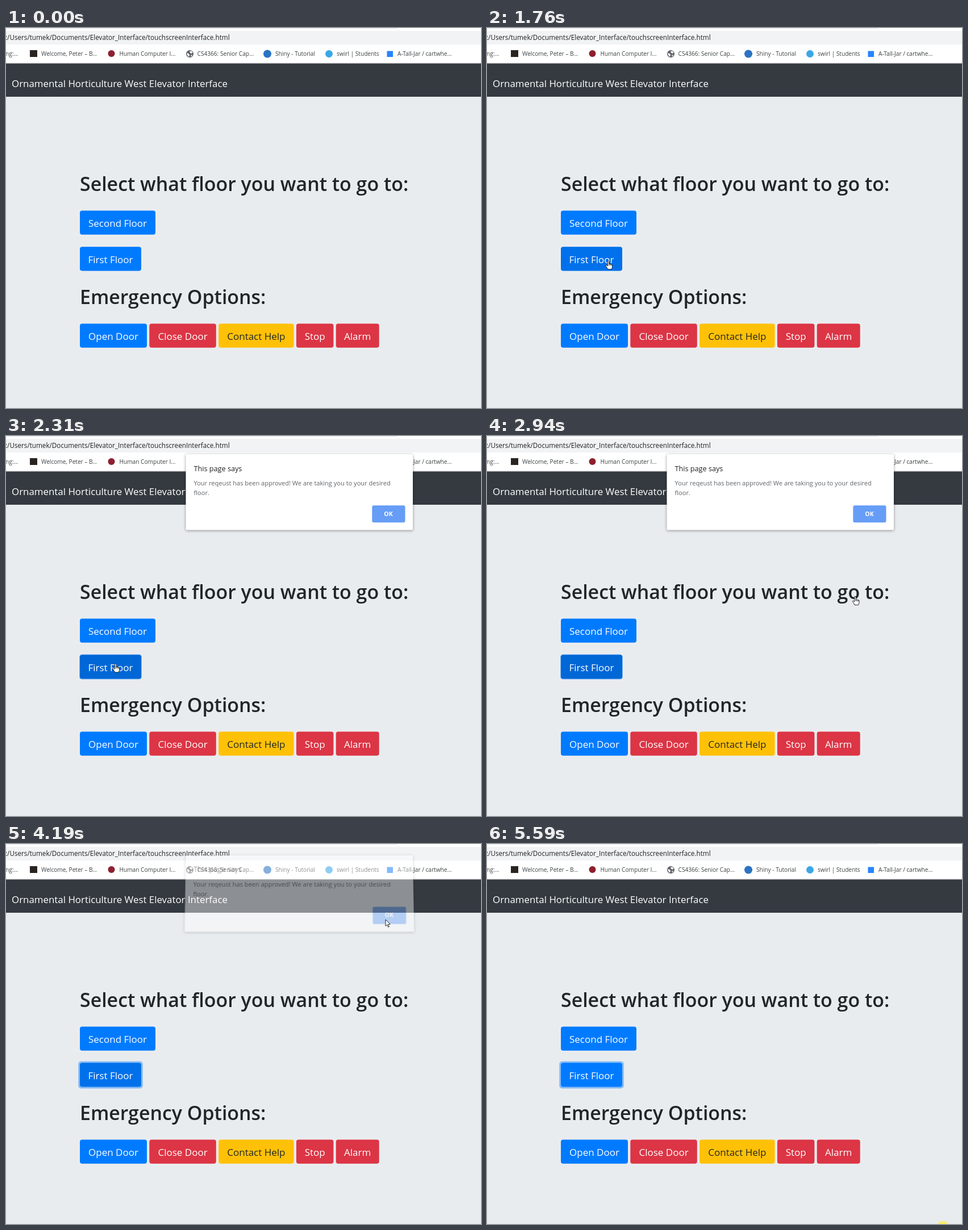
An HTML page for the animation above (5.67 s loop, 836 px wide and 669 px high).

```html
<!DOCTYPE html>
<html lang="en">
<head>
<meta charset="utf-8">
<title>Elevator Interface</title>
<style>
html, body { margin: 0; width: 100%; height: 100%; overflow: hidden; background: #e9ecef; }
svg { position: absolute; left: 0; top: 0; display: block; }
text { font-family: "Open Sans", "Noto Sans", sans-serif; white-space: pre; }
.url { font-size: 11.7px; fill: #202124; }
.marks text { font-size: 10.15px; fill: #3c4043; }
.brand { font-size: 16.9px; fill: #fff; }
.head { font-size: 33.9px; font-weight: 600; fill: #212529; }
.btn { font-size: 17px; text-anchor: middle; }
#dialog { left: 316px; top: 32px; overflow: visible; transform-origin: 50% 0;
  filter: drop-shadow(0 1.5px 2.5px rgba(0,0,0,.4)); opacity: 0; }
#dialog .title { font-size: 12.67px; fill: #222; }
#dialog .body { font-size: 11.05px; fill: #606368; }
#dialog .ok { font-size: 10.5px; font-weight: 700; fill: #fff; text-anchor: middle; }
#pointer path { fill: #fff; stroke: #111; stroke-width: .9; stroke-linejoin: round; }
</style>
</head>
<body>
<svg id="page" width="836" height="669">
  <rect width="836" height="63" fill="#fff"/>
  <rect width="688" height="1" fill="#e3e5e8"/>
  <rect y="5" width="836" height="24" fill="#f1f3f4"/>
  <text class="url" x="-1" y="21">:/Users/tumek/Documents/Elevator_Interface/touchscreenInterface.html</text>
  <g class="marks">
    <rect x="42" y="39" width="13" height="12" fill="#2a2420"/>
    <circle cx="185.5" cy="45" r="6" fill="#8e1f2d"/>
    <circle cx="323.5" cy="45.5" r="6.5" fill="#5f6368"/>
    <path d="M318.5 44l3 1 1.5 2.5-1 3q-3.5-2-3.5-6.5zM323 41l3.5-.5 2 3-2.500 1.500-2-1.500zM325 47.500h3l-2 3z" fill="#fff"/>
    <circle cx="460" cy="45.5" r="7" fill="#2a74c4"/>
    <circle cx="568.5" cy="45.5" r="6.5" fill="#3aa6e8"/>
    <rect x="670.5" y="40.5" width="10.5" height="10.5" fill="#2684ff"/>
    <text x="-1" y="49">ng:...</text>
    <text x="62" y="49">Welcome, Peter – B...</text>
    <text x="199.5" y="49">Human Computer I...</text>
    <text x="336.5" y="49">CS4366: Senior Cap...</text>
    <text x="474" y="49">Shiny - Tutorial</text>
    <text x="582" y="49">swirl | Students</text>
    <text x="689" y="49">A-Tall-Jar / cartwhe...</text>
  </g>
  <rect y="61" width="836" height="2" fill="#dadce0"/>
  <rect y="62.5" width="836" height="58.5" fill="#343a40"/>
  <text class="brand" x="10" y="104">Ornamental Horticulture West Elevator Interface</text>
  <text class="head" x="130" y="287">Select what floor you want to go to:</text>
  <text class="head" x="130" y="486">Emergency Options:</text>
  <rect id="ring" rx="5" fill="#007bff" fill-opacity=".42"/>
</svg>

<svg id="dialog" width="400" height="134">
  <rect x=".5" width="399.5" height="133.5" rx="2" fill="#fff"/>
  <text class="title" x="14.5" y="29.5">This page says</text>
  <text class="body" x="14.5" y="55">Your reqeust has been approved! We are taking you to your desired</text>
  <text class="body" x="14.5" y="72">floor.</text>
  <rect id="ok" x="328.3" y="90.2" width="58.2" height="30" rx="3"/>
  <text class="ok" x="357" y="108.5">OK</text>
</svg>

<svg id="top" width="836" height="669">
  <g id="pointer">
    <circle id="click" cx="-.5" cy="2" r="10.5" fill="#fff03c" fill-opacity=".7"/>
    <path id="arrow" d="M0 0V11.5L2.700 9 4.600 13.300 6.400 12.500 4.500 8.400 8.200 8.200Z"/>
    <path id="hand" d="M-1.200 1Q0-.6 1.200 1V6Q2.500 5.200 3.500 6.400 4.800 5.800 5.600 7 7 6.600 7 8.200V11Q7 13 5.600 15.500H-1Q-1.600 13-4.600 9.600-4.800 8-3 8.200L-1.200 9.800ZM1.200 6V9M3.500 6.400V9M5.600 7V9"/>
  </g>
</svg>

<script>
// All times below are in ticks: the loop is cut into equal steps
const LOOP = 5670, TICKS = 73, PHASE = 32;
const BLUE = '#007bff', RED = '#dc3545', AMBER = '#ffc107';
const LEFT = 130, FIRST_Y = 385.3, HEIGHT = 42.3, GAP = 4.3;

const $ = id => document.getElementById(id);
const set = (el, attrs) => { for (const k in attrs) el.setAttribute(k, attrs[k]); return el; };
const make = (tag, attrs) => $('page').appendChild(
  set(document.createElementNS('http://www.w3.org/2000/svg', tag), attrs));
const show = (el, on) => { el.style.display = on ? '' : 'none'; };
const ramp = (n, a, b) => Math.min(1, Math.max(0, (n - a) / (b - a)));
const ease = k => k * k * (3 - 2 * k);
const mix = (a, b, k) => `color-mix(in srgb, ${a}, ${b} ${k * 100}%)`;

function button(label, x, y, width, fill) {
  const box = make('rect', { x, y, width, height: HEIGHT, rx: 4, fill });
  const color = fill === AMBER ? '#212529' : '#fff';
  make('text', { class: 'btn', x: x + width / 2, y: y + 28.5, fill: color }).textContent = label;
  return box;
}

button('Second Floor', LEFT, 321.5, 133, BLUE);
const first = button('First Floor', LEFT, FIRST_Y, 108, BLUE);
let right = LEFT;
const [, , help] = [
  ['Open Door', 118, BLUE], ['Close Door', 117.5, RED], ['Contact Help', 132.5, AMBER],
  ['Stop', 65.5, RED], ['Alarm', 76, RED],
].map(([label, width, fill]) => {
  const box = button(label, right, 520.5, width, fill);
  right += width + GAP;
  return box;
});

// Pointer glides: start, end, x, y, height of the arc
const glides = [
  [3, 12, 414, 532, 185],
  [12, 15, 397, 512, 0],
  [15, 17, 327, 457, 0],
  [20, 24, 192.5, 400.5, 0],
  [34, 38, 648, 282, 0],
  [40, 48, 668, 133, 0],
  [56, 60, 731, 428, 0],
  [62, 68, 803, 672, 0],
];

function pointerAt(n) {
  let x = 690, y = 595;
  for (const [start, end, toX, toY, arc] of glides) {
    const k = ease(ramp(n, start, end));
    x += (toX - x) * k;
    y += (toY - y) * k - arc * 4 * k * (1 - k);
  }
  return [x, y];
}

function draw(now) {
  const n = Math.min(TICKS - 1, Math.floor((now % LOOP + PHASE) / LOOP * TICKS));
  const [x, y] = pointerAt(n);
  const hand = n > 22 && n < 52 && y > 166;

  set($('pointer'), { transform: `translate(${x} ${y})` });
  show($('pointer'), n >= 4);
  show($('hand'), hand);
  show($('arrow'), !hand);
  show($('click'), n >= 26 && n < 28 || n >= 49 && n < 53 || n >= 72);

  help.style.fill = mix(AMBER, '#dea600', ramp(n, 11, 13) - ramp(n, 15, 17));
  first.style.fill = mix(BLUE, '#0067d6', ramp(n, 22, 24) - ramp(n, 53, 55));

  // The focus ring pauses while the dialog is open, then completes
  const r = n < 26 ? 0 : 1 + 1.8 * ramp(n, 52.5, 54);
  set($('ring'), { x: LEFT - r, y: FIRST_Y - r, width: 108 + 2 * r, height: HEIGHT + 2 * r });

  const open = ramp(n, 27.9, 29.3) - ramp(n, 52.7, 55);
  const tilt = (1 - open) ** .7;
  $('dialog').style.opacity = open;
  $('dialog').style.transform = tilt
    ? `translateY(${-18 * tilt}px) perspective(1000px) rotateX(${7 * tilt}deg)` : 'none';
  $('ok').style.fill = n > 40 && y < 152 ? '#6fa4f8' : '#669df6';
}

function tick() {
  draw(performance.now());
  requestAnimationFrame(tick);
}
tick();
</script>
</body>
</html>
```
